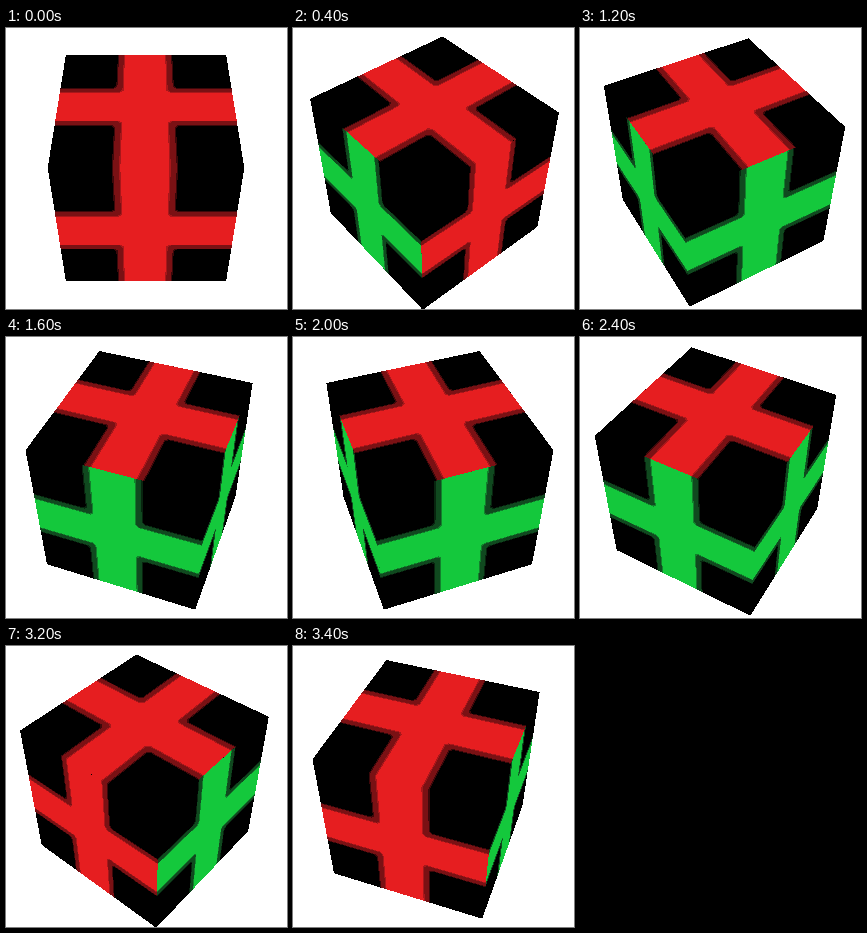
An HTML page that plays this animation: 281 px wide and 281 px high, repeating every 3.6 s.

```html
<!DOCTYPE html>
<html lang="en">
<head>
<meta charset="utf-8">
<title>Turning cube</title>
<style>
html, body { margin: 0; width: 100%; height: 100%; overflow: hidden; background: #fff; }
svg { display: block; width: 100vw; height: 100vh; shape-rendering: crispEdges; }
</style>
</head>
<body>
<svg id="stage" viewBox="0 0 281 281"></svg>
<script>
const STEP_MS = 200, STEPS = 18;
const CENTER = 140, DIST = 7.64, FOCAL = 612, TILT = Math.SQRT1_2;

// Cross layers from the soft outer rim to the bright core: half width, colour
const RED = [[0.338, '#3c080a'], [0.324, '#7a1114'], [0.264, '#a8171a'], [0.25, '#e61e20']];
const GREEN = [[0.338, '#08240f'], [0.324, '#10491f'], [0.264, '#12802c'], [0.25, '#14c83c']];

// The cross sits slightly left of and below the middle of each face
const SHIFT = 0.011, BEVEL = 0.035;

const SQUARE = [[-1, -1], [1, -1], [1, 1], [-1, 1]];

function cross(w) {
  const l = -w - SHIFT, r = w - SHIFT, t = -w + SHIFT, b = w + SHIFT, k = BEVEL;
  return [
    [l, -1], [r, -1], [r, t - k], [r + k, t], [1, t],
    [1, b], [r + k, b], [r, b + k], [r, 1], [l, 1],
    [l, b + k], [l - k, b], [-1, b], [-1, t], [l - k, t], [l, t - k]
  ];
}

const stage = document.getElementById('stage');

function addPolygon(fill) {
  const el = document.createElementNS('http://www.w3.org/2000/svg', 'polygon');
  el.setAttribute('fill', fill);
  stage.appendChild(el);
  return el;
}

// Turn (x, z) around the upright axis
function turn(x, z, a) {
  const c = Math.cos(a), s = Math.sin(a);
  return [x * c + z * s, z * c - x * s];
}

function project(x, y, z) {
  const k = FOCAL / (DIST - (y + z) * TILT);
  return [CENTER + x * k, CENTER - (y - z) * TILT * k];
}

const faces = [
  { yaw: 0, colors: RED },
  { yaw: 90, colors: GREEN },
  { yaw: 180, colors: GREEN },
  { yaw: 270, colors: GREEN },
  { yaw: 0, top: true, colors: RED }
];
for (const face of faces) {
  face.shapes = [{ el: addPolygon('#000'), points: SQUARE }];
  for (const [w, color] of face.colors) {
    face.shapes.push({ el: addPolygon(color), points: cross(w) });
  }
}

// u runs right and v runs down on every face
function place(face, angle, u, v) {
  const [x, z] = turn(u, face.top ? v : 1, angle);
  return project(x, face.top ? 1 : -v, z);
}

function draw(degrees) {
  for (const face of faces) {
    const angle = (face.yaw + degrees) * Math.PI / 180;
    const visible = face.top || Math.cos(angle) * DIST * TILT > 1;
    for (const { el, points } of face.shapes) {
      el.style.display = visible ? '' : 'none';
      if (!visible) continue;
      el.setAttribute('points', points
        .map(([u, v]) => place(face, angle, u, v).map(n => n.toFixed(2)).join())
        .join(' '));
    }
  }
}

const start = performance.now();
let shown = -1;

function tick() {
  const step = Math.floor((performance.now() - start) / STEP_MS) % STEPS;
  if (step !== shown) draw((shown = step) * 360 / STEPS);
  requestAnimationFrame(tick);
}
tick();
</script>
</body>
</html>
```
